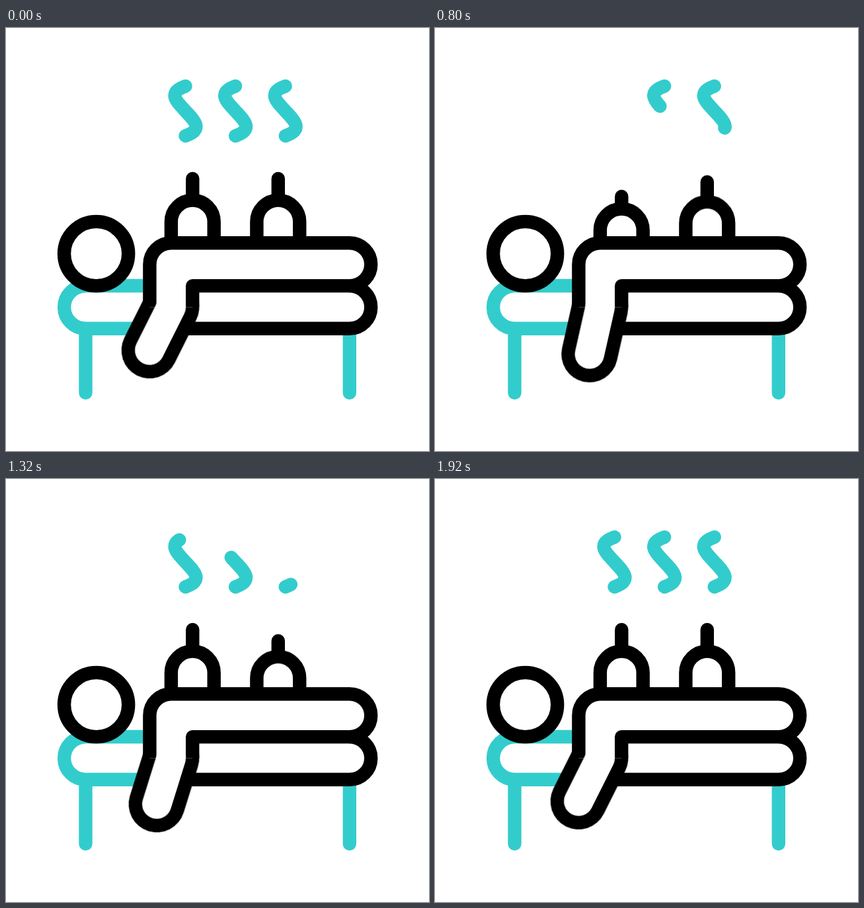
Write an HTML page that moves like this. It is 640 px wide and 640 px high and loops after 1960 ms.

```html
<!DOCTYPE html>
<html lang="en">
<head>
<meta charset="utf-8">
<title>Cupping massage</title>
<style>
  html, body { margin: 0; width: 100%; height: 100%; overflow: hidden; background: #fff; }
  svg { display: block; width: 100vw; height: 100vh; }

  .ink, .teal { fill: none; stroke: #000; stroke-width: 20.4; stroke-linecap: round; stroke-linejoin: round; }
  .teal { stroke: #33cccc; }
  .solid { fill: #fff; }

  .steam, .forearm, .pin, .dome {
    animation: 1960ms ease-in-out var(--wait, 0ms) infinite both;
  }

  /* The dash leaves through the top, then the next one enters from below. */
  .steam { stroke-dasharray: 100 142; animation-name: rise; }
  @keyframes rise {
    0%, 6.122% { stroke-dashoffset: 0; }
    77.551%, 100% { stroke-dashoffset: 242; }
  }

  .pin { --drop: 27px; animation-name: press; }
  .dome { --drop: 13px; animation-name: press; }
  @keyframes press {
    0%, 18.367%, 65.306%, 100% { transform: translateY(0); }
    41.837% { transform: translateY(var(--drop)); }
  }

  .forearm { stroke-linecap: round; transform-origin: 249.8px 422.6px; animation-name: swing; }
  @keyframes swing {
    0%, 6.122%, 91.837%, 100% { transform: rotate(26.6deg); }
    48.98% { transform: rotate(11.6deg); }
  }
</style>
</head>
<body>
<svg viewBox="0 0 640 640">
  <defs>
    <path id="wisp" pathLength="100" d="M0 0C-5 2-16 5.5-16 14.5C-16 21-7 30 0 37.6C7 45.2 16 54.2 16 60.7C16 69.7 5 73.2 0 75.2"/>
  </defs>

  <!-- steam -->
  <g class="teal">
    <use href="#wisp" class="steam" x="271.5" y="88"/>
    <use href="#wisp" class="steam" x="347.1" y="88" style="--wait:200ms"/>
    <use href="#wisp" class="steam" x="422.7" y="88" style="--wait:400ms"/>
  </g>

  <!-- bed -->
  <path class="teal" d="M120.5 455V552M519.8 455V552M217 390H120.5a32.4 32.4 0 0 0 0 64.8H242"/>

  <circle class="ink solid" cx="136.6" cy="341.5" r="48.6"/>

  <!-- cups -->
  <g>
    <path class="ink pin" d="M282.3 228V260"/>
    <path class="ink solid dome" d="M249.9 325V293a32.4 32.4 0 0 1 64.8 0V325"/>
  </g>
  <g style="--wait:305ms">
    <path class="ink pin" d="M411.8 228V260"/>
    <path class="ink solid dome" d="M379.4 325V293a32.4 32.4 0 0 1 64.8 0V325"/>
  </g>

  <!-- body -->
  <path class="ink" d="M250 454.8H519.8a32.4 32.4 0 0 0 0-64.8"/>
  <path class="forearm" d="M249.8 422.6v72.7" stroke="#000" stroke-width="85.2"/>
  <path class="ink solid" style="stroke-linecap:butt" d="M217.4 422.6V357.7a32.4 32.4 0 0 1 32.4-32.4H519.8a32.4 32.4 0 0 1 0 64.8H282.2V422.6"/>
  <path class="forearm" d="M249.8 422.6v72.7" stroke="#fff" stroke-width="44.4"/>
</svg>
</body>
</html>
```
